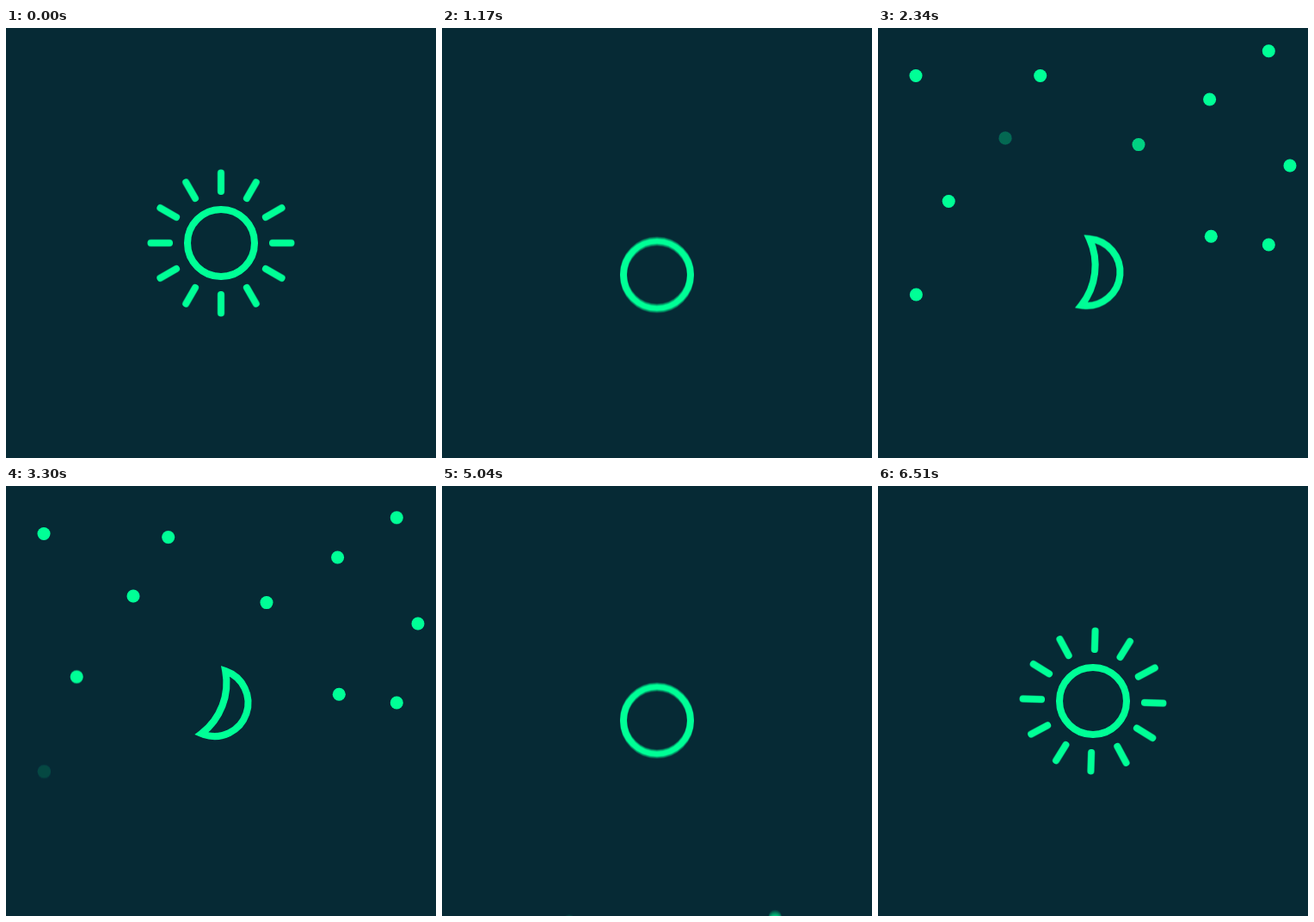
These frames come from a looping animation (500 px wide and 500 px high, 6540 ms). An HTML page with a canvas:

```html
<!DOCTYPE html>
<html lang="en">
<head>
<meta charset="utf-8">
<title>Sun and moon</title>
<style>
  html, body { margin: 0; width: 100%; height: 100%; overflow: hidden; background: #062a35; }
  canvas { display: block; width: 100vw; height: 100vh; }
</style>
</head>
<body>
<canvas id="sky" width="500" height="500"></canvas>
<script>
const ctx = document.getElementById('sky').getContext('2d');
const LOOP = 6540, STEP = 30, SHUTTER = 16, SAMPLES = 15;
const GREEN = '#00fc99';
const MID = 250, OFF = 295, R = 39;

// x, y, fade-in start, fall start, ms per cube-root pixel, fade-out start
const stars = [
  [44, 55.5, 1500, 3555, 138.7],
  [188.7, 55.5, 1600, 3028, 171],
  [454.3, 26.7, 1700, 2797, 233],
  [385.6, 83, 1750, 3500, 175.6],
  [148, 128, 2250, 4006, 142],
  [303, 135.6, 2100, 3715, 183],
  [479, 160, 1800, 3790, 118],
  [82.2, 201.5, 1650, 2800, 183],
  [387.3, 242.3, 1950, 3785, 196],
  [454.3, 252, 1900, 4168, 71],
  [44.4, 310, 1550, 2800, 178, 3000]
];

const clamp = v => Math.max(0, Math.min(1, v));
const part = (t, start, span) => clamp((t - start) / span);
const rad = deg => deg * Math.PI / 180;

function drawStars(t, alpha) {
  for (const [x, y, fadeIn, fall, pace, fadeOut] of stars) {
    let a = part(t, fadeIn, 300);
    if (fadeOut) a *= 1 - part(t, fadeOut, 350);
    const drop = Math.pow(Math.max(0, t - fall) / pace, 3);
    if (a <= 0 || y + drop > 520) continue;
    ctx.globalAlpha = alpha * a;
    ctx.beginPath();
    ctx.arc(x, y + drop, 7.5, 0, 7);
    ctx.fill();
  }
  ctx.globalAlpha = alpha;
}

function sunY(t) {
  if (t < 3000) return MID + 37 * Math.pow(Math.max(0, t - 520) / 650, 4);
  return MID + OFF * Math.pow(1 - part(t, 4620, 730), 3);
}

function drawSun(t) {
  const y = sunY(t);
  if (y >= MID + OFF) return;
  ctx.save();
  ctx.translate(MID, y);
  ctx.beginPath();
  ctx.arc(0, 0, R, 0, 7);
  ctx.stroke();
  const turn = t < 3000 ? t : t - LOOP;
  ctx.rotate(rad(-0.06 * turn));
  for (let i = 0; i < 12; i++) {
    const size = t < 3000
      ? 1 - part(t, 380 + 35 * i, 250)
      : part(t, 5330 + 25 * i, 250);
    if (size > 0) {
      ctx.beginPath();
      ctx.moveTo(0, -60);
      ctx.lineTo(0, -60 - 21.5 * size);
      ctx.stroke();
    }
    ctx.rotate(rad(30));
  }
  ctx.restore();
}

function moonY(t) {
  const rise = 98 * Math.exp((1980 - t) / 340);
  const lift = 135 * (1 - Math.cos(Math.PI * part(t, 3400, 530))) / 2;
  const fall = 430 * Math.pow(Math.max(0, t - 3930) / 350, 2);
  return MID + rise - lift + fall;
}

function drawMoon(t) {
  if (t < 1600 || t > 4290) return;
  const half = rad(92), sag = 11;
  const h = R * Math.sin(half), back = R * Math.cos(half);
  const r = (h * h + sag * sag) / (2 * sag);
  const bend = Math.asin(h / r);
  ctx.save();
  ctx.translate(242.5, moonY(t));
  ctx.rotate(rad(21 + (t - 3300) * 0.0146));
  ctx.beginPath();
  ctx.arc(0, 0, R, -half, half);
  ctx.arc(back + sag - r, 0, r, bend, -bend, true);
  ctx.closePath();
  ctx.stroke();
  ctx.restore();
}

// Sums evenly weighted sub-moments to give motion blur.
function draw(t) {
  ctx.globalCompositeOperation = 'source-over';
  ctx.clearRect(0, 0, 500, 500);
  ctx.globalCompositeOperation = 'lighter';
  ctx.fillStyle = ctx.strokeStyle = GREEN;
  ctx.lineWidth = 8;
  ctx.lineCap = 'round';
  ctx.lineJoin = 'miter';
  const alpha = 1 / SAMPLES;
  for (let i = 0; i < SAMPLES; i++) {
    const s = t + SHUTTER * ((i + 0.5) / SAMPLES - 0.5);
    ctx.globalAlpha = alpha;
    drawSun(s);
    drawMoon(s);
    drawStars(s, alpha);
  }
}

const began = performance.now();
function tick() {
  const t = (performance.now() - began) % LOOP;
  draw(Math.floor(t / STEP) * STEP);
  requestAnimationFrame(tick);
}
tick();
</script>
</body>
</html>
```
